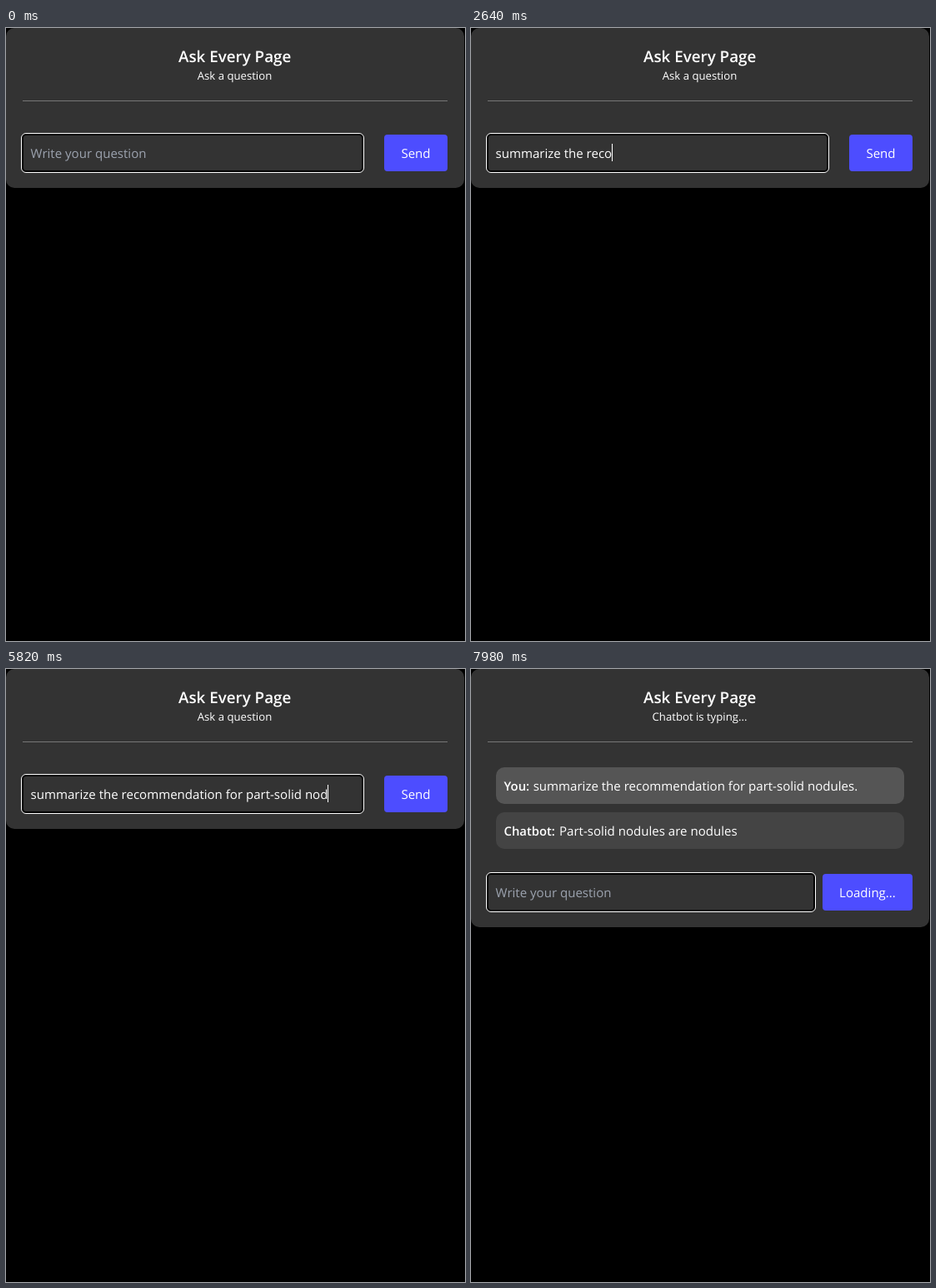
These frames come from a looping animation (551 by 736 pixels, 8000 ms). An HTML page:

```html
<!DOCTYPE html>
<html lang="en">
<head>
<meta charset="utf-8">
<title>Chat form</title>
<style>
html, body { margin: 0; width: 100%; height: 100%; overflow: hidden; background: #000; }
svg { display: block; width: 551px; height: 736px; }
text {
  font: 15.05px "Open Sans", "Noto Sans", sans-serif;
  fill: #fff;
  white-space: pre;
  text-rendering: geometricPrecision;
}
.mid { text-anchor: middle; }
.title { font-size: 18.8px; font-weight: 600; }
.status { font-size: 13.17px; }
.name { font-size: 14.8px; font-weight: 600; }
.hint { fill: #9ca3af; }
</style>
</head>
<body>
<svg viewBox="0 0 551 736">
  <clipPath id="inner"><rect x="29" y="130" width="389" height="40"/></clipPath>
  <rect id="card" width="550" height="192" rx="10" fill="#333"/>
  <text class="mid title" x="274.7" y="41">Ask Every Page</text>
  <text class="mid status" id="status" x="274.5" y="62"></text>
  <rect x="20" y="87" width="510" height="1" fill="#767676"/>

  <g id="messages">
    <rect x="30" y="118" width="490" height="44" rx="10" fill="#555"/>
    <text class="name" x="39.6" y="146">You:</text>
    <text id="question" x="74.7" y="146"></text>
    <rect x="30" y="172" width="490" height="44" rx="10" fill="#444"/>
    <text class="name" x="39.6" y="200">Chatbot:</text>
    <text id="answer" x="106" y="200"></text>
  </g>

  <g id="form">
    <rect id="ring" x="18.5" y="126.5" height="47" rx="5.5" fill="#000" stroke="#fff"/>
    <rect id="field" x="21" y="129" height="42" rx="3" fill="#333"/>
    <text class="hint" id="hint" x="29.6" y="156">Write your question</text>
    <g clip-path="url(#inner)"><text id="typed" y="156"></text></g>
    <rect id="caret" width="1" height="21" fill="#fff"/>
    <rect id="button" y="128" height="44" rx="4" fill="#4d4dff"/>
    <text class="mid" id="label" y="156"></text>
  </g>
</svg>
<script>
const LOOP = 8000, SENT = 6480, REPLY = 7240;
const LEFT = 30, ROOM = 388;

// [first key, last key, characters]
const keys = [
  [570, 990, "summari"], [1230, 1230, "ze"], [1290, 1290, " "],
  [1980, 2160, "the "], [2460, 2640, "reco"], [2730, 3180, "mmendat"],
  [3210, 3330, "ion "], [3990, 4140, "for "], [4450, 4590, "par"],
  [4830, 4830, "t"], [5010, 5010, "-"], [5130, 5520, "solid "],
  [5670, 6060, "nodules"], [6420, 6420, "."]
];
const tokens = [
  [REPLY, "Part"], [7440, "-sol"], [7650, "id nod"],
  [7850, "ules"], [7920, " are"], [7980, " nodules"]
];
const caretOff = [
  [0, 150], [360, 570], [1530, 1770], [2400, 2460], [3570, 3810],
  [4380, 4450], [6300, 6420], [6920, 7440], [7920, LOOP]
];

const el = {};
document.querySelectorAll("[id]").forEach(node => el[node.id] = node);

const set = (node, attrs) => {
  for (const name in attrs) node.setAttribute(name, attrs[name]);
};
const show = (node, on) => set(node, { visibility: on ? "visible" : "hidden" });
const write = (node, text) => {
  if (node.textContent !== text) node.textContent = text;
};

function typedAt(t) {
  return keys.map(([from, to, chars]) => {
    if (t < from) return "";
    if (t >= to) return chars;
    const step = (to - from) / (chars.length - 1);
    return chars.slice(0, 1 + Math.floor((t - from) / step));
  }).join("");
}

const answerAt = t => tokens.filter(([at]) => t >= at).map(([, text]) => text).join("");

function layout(sent) {
  const fieldRight = sent ? 412 : 428;
  const buttonLeft = sent ? 422 : 454;
  set(el.card, { height: sent ? 310 : 192 });
  set(el.form, { transform: `translate(0 ${sent ? 118 : 0})` });
  set(el.ring, { width: fieldRight - 17 });
  set(el.field, { width: fieldRight - 22 });
  set(el.button, { x: buttonLeft, width: 530 - buttonLeft });
  set(el.label, { x: (buttonLeft + 530) / 2 });
  write(el.label, sent ? "Loading..." : "Send");
  show(el.messages, sent);
}

function draw(t) {
  const sent = t >= SENT;
  const text = sent ? "" : typedAt(t);
  layout(sent);

  write(el.status, !sent ? "Ask a question" : t < REPLY ? "Computing answer..." : "Chatbot is typing...");
  write(el.question, sent ? typedAt(SENT) : "");
  write(el.answer, answerAt(t));
  write(el.typed, text);
  show(el.hint, !text);

  const width = text ? el.typed.getComputedTextLength() : 0;
  const scroll = Math.max(0, width + 1 - ROOM);
  set(el.typed, { x: LEFT - 0.4 - scroll });
  set(el.caret, {
    x: Math.min(416, Math.floor(LEFT + width - scroll)),
    y: text ? 139 : 140
  });
  show(el.caret, !caretOff.some(([from, to]) => t >= from && t < to));
}

const start = performance.now();
function tick() {
  draw((performance.now() - start) % LOOP);
  requestAnimationFrame(tick);
}
tick();
</script>
</body>
</html>
```
